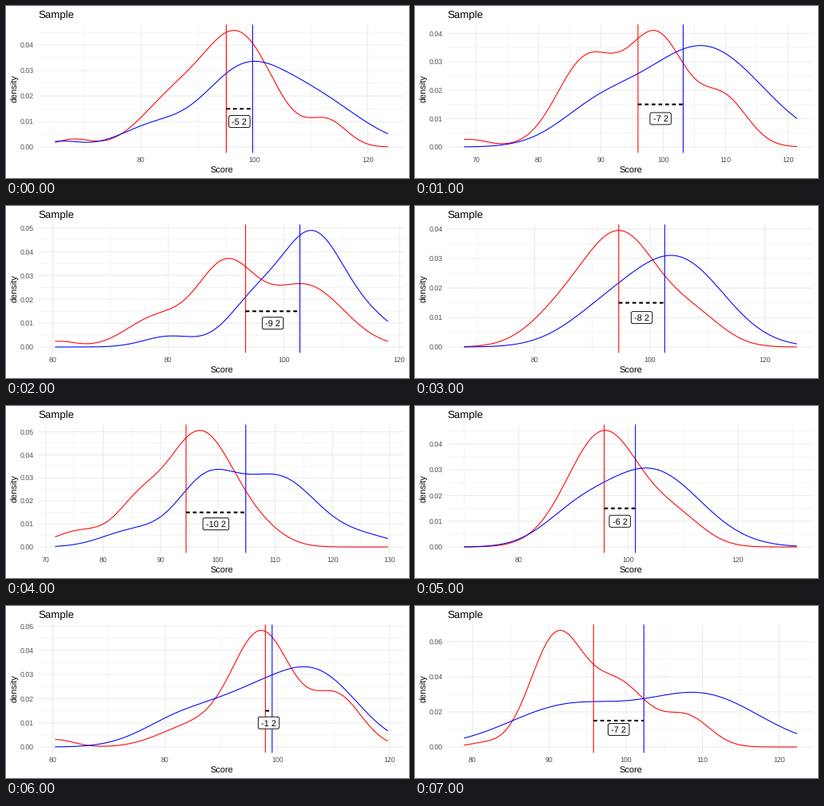
Write a matplotlib script that moves like this. It is 504 by 216 pixels and loops after 8000 ms.

```python
import math
from collections import namedtuple

import numpy as np
import matplotlib.pyplot as plt
from matplotlib.animation import FuncAnimation
from matplotlib.patches import FancyBboxPatch

plt.rcParams["font.family"] = "Liberation Sans"
plt.rcParams["text.hinting"] = "none"

W, H = 504, 216
LEFT, RIGHT, TOP, BOTTOM = 40.5, 498.5, 23.3, 184.4
PAD_X, PAD_Y = (RIGHT - LEFT) / 22, (BOTTOM - TOP) / 22  # 5% beyond the data
ZERO = BOTTOM - PAD_Y
GRID, TICK = "#ebebeb", "#4d4d4d"
COLORS = "red", "blue"

# Each curve is a sum of bells: (centre, height in thousandths, spread).
Sample = namedtuple("Sample", "lo hi step means red blue")
SAMPLES = [
    Sample(64.8, 123.6, 20, (95.04, 99.69),
           [(68, 3, 3.1), (85.2, 16.5, 5.6), (97.1, 43.8, 6.2),
            (113, 9.6, 3.4)],
           [(65.8, 2.2, 3.4), (81.8, 7.5, 5.6), (97.3, 25.5, 7),
            (109.8, 19.3, 8.5)]),
    Sample(68.1, 121.4, 10, (95.95, 103.18),
           [(68.7, 2.7, 3.2), (87.8, 30.8, 4.8), (99, 38.5, 4.6),
            (109.7, 16.6, 3.8)],
           [(89.3, 11, 6.3), (106.3, 35.4, 9.5)]),
    Sample(60.4, 118, 20, (93.37, 102.77),
           [(60.9, 2.4, 3), (77.8, 12, 5.1), (89.9, 33.7, 5),
            (103.8, 25.7, 6.5)],
           [(80.2, 4.5, 4.4), (94.5, 16.3, 4.6), (104.9, 46.7, 5.5),
            (115.5, 9, 5)]),
    Sample(67.7, 125.6, 20, (94.6, 102.6),
           [(84, 9, 5.5), (95, 38, 6.5), (108, 9, 5)],
           [(92, 10, 7), (105, 29, 8)]),
    Sample(71.6, 129.7, 10, (94.46, 104.88),
           [(75.9, 6.9, 4.5), (85.8, 14.3, 3.8), (96.9, 50.2, 6),
            (107.7, 4.5, 4.2)],
           [(85.1, 6.9, 5.3), (98, 27.2, 5.2), (110.7, 29.7, 6.7),
            (125.8, 4.1, 5.3)]),
    Sample(70, 130.8, 20, (95.6, 101.3),
           [(95.6, 45, 6.6), (109, 10, 5)],
           [(90, 9, 6), (104, 30, 9)]),
    Sample(60.4, 119.7, 20, (97.86, 99.07),
           [(60.4, 3.1, 3.3), (84.4, 8.2, 5.7), (97.2, 47.4, 5.3),
            (110.6, 20.7, 4.4)],
           [(82.4, 10.2, 6.8), (95.8, 19.1, 7.8), (107.9, 25.7, 7.1)]),
    Sample(78.9, 122.3, 10, (95.78, 102.34),
           [(81.1, 1.8, 1.9), (91, 62.5, 3.4), (99.1, 35.2, 3.75),
            (108, 16.7, 3)],
           [(92.5, 23, 7.8), (110, 28.9, 7.5)]),
]


def density(x, bells):
    return sum(h / 1000 * np.exp(-((x - c) / s) ** 2 / 2) for c, h, s in bells)


def line(xs, ys, color, width=1.07, **kw):
    ax.plot(xs, ys, color=color, lw=width, snap=False,
            solid_capstyle="butt", dash_capstyle="butt", **kw)


def text(x, y, s, size=11, color="black", ha="center", va="baseline", **kw):
    ax.text(x, y, s, fontsize=size, color=color, ha=ha, va=va, **kw)


def breaks(lo, hi, step):
    """Multiples of half a step inside the range; whole steps come last."""
    half = step / 2
    ks = range(math.ceil(lo / half), math.floor(hi / half) + 1)
    return [(k * half, k % 2 == 0) for k in sorted(ks, key=lambda k: k % 2 == 0)]


def draw_grid(sample, px, py, peak):
    margin = (sample.hi - sample.lo) / 20
    for v, major in breaks(sample.lo - margin, sample.hi + margin, sample.step):
        line([px(v)] * 2, [TOP, BOTTOM], GRID, 1.07 if major else 0.53)
        if major:
            text(px(v), 195.6, f"{v:.0f}", 8.8, TICK)
    for v, major in breaks(0, peak * 1.05, 0.02 if peak > 0.06 else 0.01):
        line([LEFT, RIGHT], [py(v)] * 2, GRID, 1.07 if major else 0.53)
        if major:
            text(35.2, py(v) + 3.2, f"{v:.2f}", 8.8, TICK, "right")


def draw_label(x, y, s):
    w, h = 26.4 + 6.1 * (len(s) - 4), 15
    ax.add_patch(FancyBboxPatch(
        (x - w / 2, y - h / 2), w, h, boxstyle="round,pad=0,rounding_size=2.2",
        fc="white", ec="black", lw=0.9, zorder=3))
    text(x, y + 4, s, zorder=4)


def draw(i):
    sample = SAMPLES[i]
    x = np.linspace(sample.lo, sample.hi, 512)
    curves = [density(x, bells) for bells in (sample.red, sample.blue)]
    peak = np.max(curves)

    def px(v):
        span = RIGHT - LEFT - 2 * PAD_X
        return LEFT + PAD_X + (v - sample.lo) / (sample.hi - sample.lo) * span

    def py(v):
        return ZERO - v / peak * (ZERO - TOP - PAD_Y)

    ax.clear()
    ax.set(xlim=(0, W), ylim=(H, 0))
    ax.axis("off")
    text(40.5, 15.2, "Sample", 13.2, ha="left")
    text(269.5, 209.2, "Score")
    text(11.8, 104, "density", va="center", rotation=90)
    draw_grid(sample, px, py, peak)
    for curve, color in zip(curves, COLORS):
        line(px(x), py(curve), color)
    for mean, color in zip(sample.means, COLORS):
        line([px(mean)] * 2, [TOP, BOTTOM], color)
    a, b = sample.means
    line([px(a), px(b)], [py(0.015)] * 2, "black", 2.13,
         linestyle=(0, (2.2, 1.8)))
    draw_label(px((a + b) / 2), py(0.01), f"{round(a - b)} 2")
    return []


fig = plt.figure(figsize=(W / 72, H / 72), dpi=72, facecolor="white")
ax = fig.add_axes([0, 0, 1, 1])
anim = FuncAnimation(fig, draw, frames=len(SAMPLES), interval=1000,
                     init_func=lambda: [], repeat=True, repeat_delay=0)
plt.show()
```
